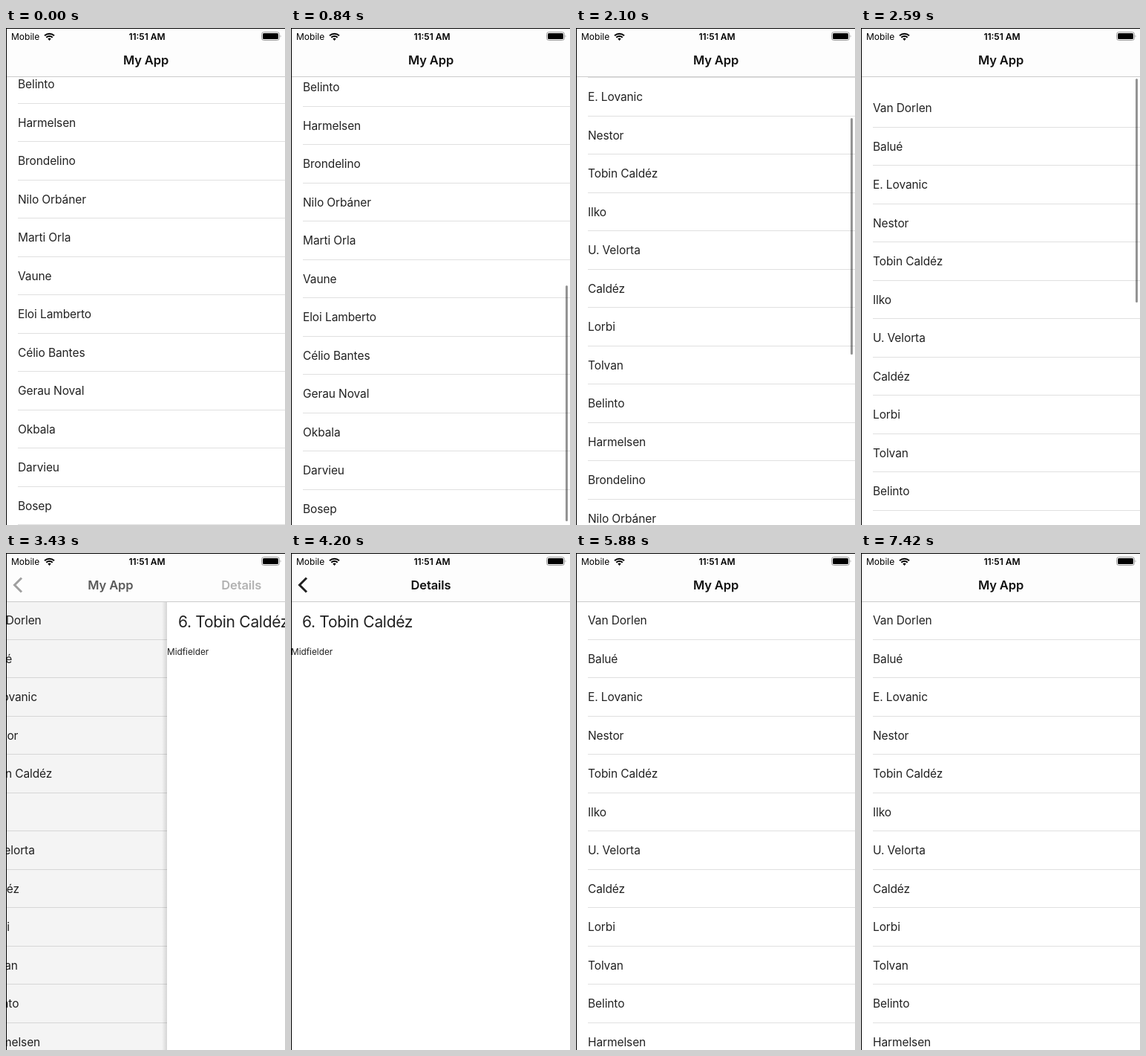
Recreate the animation shown at these times as an HTML page. Size 376x668 px, loop 7490 ms.

```html
<!DOCTYPE html>
<html lang="en">
<head>
<meta charset="utf-8">
<title>My App</title>
<style>
  html, body { margin: 0; width: 100%; height: 100%; overflow: hidden; background: #fff; }
  body { font-family: Inter, Roboto, sans-serif; color: #222; }
  body * { box-sizing: border-box; position: absolute; }
  #stage { left: 0; top: 0; width: 376px; height: 668px; overflow: hidden; }
  #view { left: 0; top: 65px; width: 376px; height: 603px; overflow: hidden; }
  #list, #dim { left: 0; top: 0; width: 376px; height: 603px; }
  #dim { background: #000; }
  .row {
    left: 16px; width: 360px; height: 51.5px; border-bottom: 1px solid #e0e0e0;
    font-size: 15.5px; letter-spacing: -.1px; line-height: 51.5px; white-space: nowrap;
  }
  #bar { left: 370px; width: 3px; border-radius: 2px; background: rgba(0, 0, 0, .42); }
  #detail { left: 0; top: 65px; width: 376px; height: 603px; background: #fff; white-space: nowrap; }
  #shadow {
    left: -7px; top: 0; width: 7px; height: 603px;
    background: linear-gradient(90deg, rgba(0, 0, 0, 0), rgba(0, 0, 0, .13));
  }
  #name { left: 15px; top: 14px; font-size: 21px; letter-spacing: -.3px; line-height: 28px; }
  #role { left: 0; top: 58px; font-size: 11.8px; line-height: 20px; }
  #header { left: 0; top: 0; width: 376px; height: 66px; background: #fdfdfd; border-bottom: 1px solid #cbcbcb; }
  .title {
    left: 0; top: 31px; width: 377px; text-align: center; color: #111;
    font-size: 16.5px; font-weight: 600; letter-spacing: -.1px; line-height: 24px;
  }
  .status { top: 3px; font-size: 12px; line-height: 17px; color: #000; white-space: nowrap; }
  #clock { left: 140px; width: 100px; text-align: center; font-weight: 600; }
  svg { left: 0; top: 0; }
  #edge { left: 0; top: 0; width: 377px; height: 669px; border: solid #000; border-width: 1px 0 0 1px; }
</style>
</head>
<body>
<div id="stage">
  <div id="view">
    <div id="list"></div>
    <div id="dim"></div>
  </div>
  <div id="bar"></div>
  <div id="detail">
    <div id="shadow"></div>
    <div id="name">6. Tobin Caldéz</div>
    <div id="role">Midfielder</div>
  </div>
  <div id="header">
    <div class="status" style="left:7px">Mobile</div>
    <div class="status" id="clock">11:51 AM</div>
    <div class="title" id="home">My App</div>
    <div class="title" id="details">Details</div>
    <svg width="376" height="65" fill="none">
      <g stroke="#000" stroke-width="2">
        <path d="M52 10.2A9.5 9.5 0 0 1 65 10.2M54.3 12.8A6 6 0 0 1 62.7 12.8"/>
        <path d="M56.3 14.6A3 3 0 0 1 60.7 14.6L58.5 17z" fill="#000" stroke="none"/>
      </g>
      <rect x="344.5" y="5.5" width="24" height="11" rx="3" stroke="#999"/>
      <rect x="346" y="7" width="21" height="8" rx="1.5" fill="#000"/>
      <path d="M369.7 9.2q1.8 1.8 0 3.6z" fill="#999"/>
      <path id="back" d="M21 33.5L11.5 43L21 52.5" stroke="#222" stroke-width="3"/>
    </svg>
  </div>
  <div id="edge"></div>
</div>
<script>
const LOOP = 7490, WIDTH = 376, ROW = 51.5, VIEW = 602;
const players = ["Van Dorlen", "Balué", "E. Lovanic", "Nestor", "Tobin Caldéz", "Ilko", "U. Velorta",
  "Caldéz", "Lorbi", "Tolvan", "Belinto", "Harmelsen", "Brondelino", "Nilo Orbáner", "Marti Orla",
  "Vaune", "Eloi Lamberto", "Célio Bantes", "Gerau Noval", "Okbala", "Darvieu", "Bosep"];
const total = players.length * ROW;
const el = id => document.getElementById(id);
const clamp = x => Math.min(1, Math.max(0, x));
const smooth = x => (x = clamp(x), x * x * (3 - 2 * x));

players.forEach((player, i) => {
  const row = document.createElement("div");
  row.className = "row";
  row.style.top = i * ROW + "px";
  row.textContent = player;
  el("list").append(row);
});

// Cubic Hermite curve through [time, value, slope] points
function curve(t, points) {
  if (t <= points[0][0]) return points[0][1];
  for (let i = 1; i < points.length; i++) {
    const [t0, a, m0] = points[i - 1], [t1, b, m1] = points[i];
    if (t > t1) continue;
    const d = t1 - t0, u = (t - t0) / d;
    return a + (b - a) * smooth(u) + d * u * (1 - u) * (m0 * (1 - u) - m1 * u);
  }
  return points[points.length - 1][1];
}

const scrollPath = [[490, 530, 0], [1330, 451, -.3], [2100, 101, -.42],
  [2480, -24, 0], [2590, -17, .09], [2830, 0, 0]];
const popPath = [[4700, 1, 0], [5040, .4, -.0022], [5440, 0, 0]];

// Critically damped spring from 0 to 1
function spring(t) {
  const k = Math.max(0, t) * .0119;
  return 1 - (1 + k) * Math.exp(-k);
}

function place(node, x, y, opacity = 1) {
  node.style.transform = `translate(${x}px, ${y}px)`;
  node.style.opacity = opacity;
}

function draw(t) {
  const popping = t > 4100;
  const page = popping ? curve(t, popPath) : spring(t - 3310);
  const nav = popping ? page : smooth((t - 3300) / 350);
  const scroll = Math.round(curve(t, scrollPath));
  const inset = popping ? Math.round(20 * (1 - smooth((t - 5460) / 210))) : 0;

  place(el("list"), Math.round(-.3 * WIDTH * page), inset - scroll);
  el("dim").style.opacity = .1 * page;
  place(el("detail"), Math.round(WIDTH * (1 - page)), 0);
  el("detail").style.visibility = page > 0 ? "visible" : "hidden";
  el("shadow").style.opacity = clamp((1 - page) * 3);

  place(el("home"), -151 * nav, 0, 1 - nav);
  place(el("details"), 188 * (1 - nav), 0, nav);
  el("back").style.opacity = page;

  const track = VIEW - 4;
  const bar = el("bar");
  bar.style.top = 68 + Math.max(0, scroll) * track / total + "px";
  bar.style.height = track * VIEW / total + Math.min(0, scroll) + "px";
  bar.style.opacity = clamp((t - 470) / 120) * clamp((3100 - t) / 250);
}

const start = performance.now();
function tick() {
  draw((performance.now() - start) % LOOP);
  requestAnimationFrame(tick);
}
tick();
</script>
</body>
</html>
```
